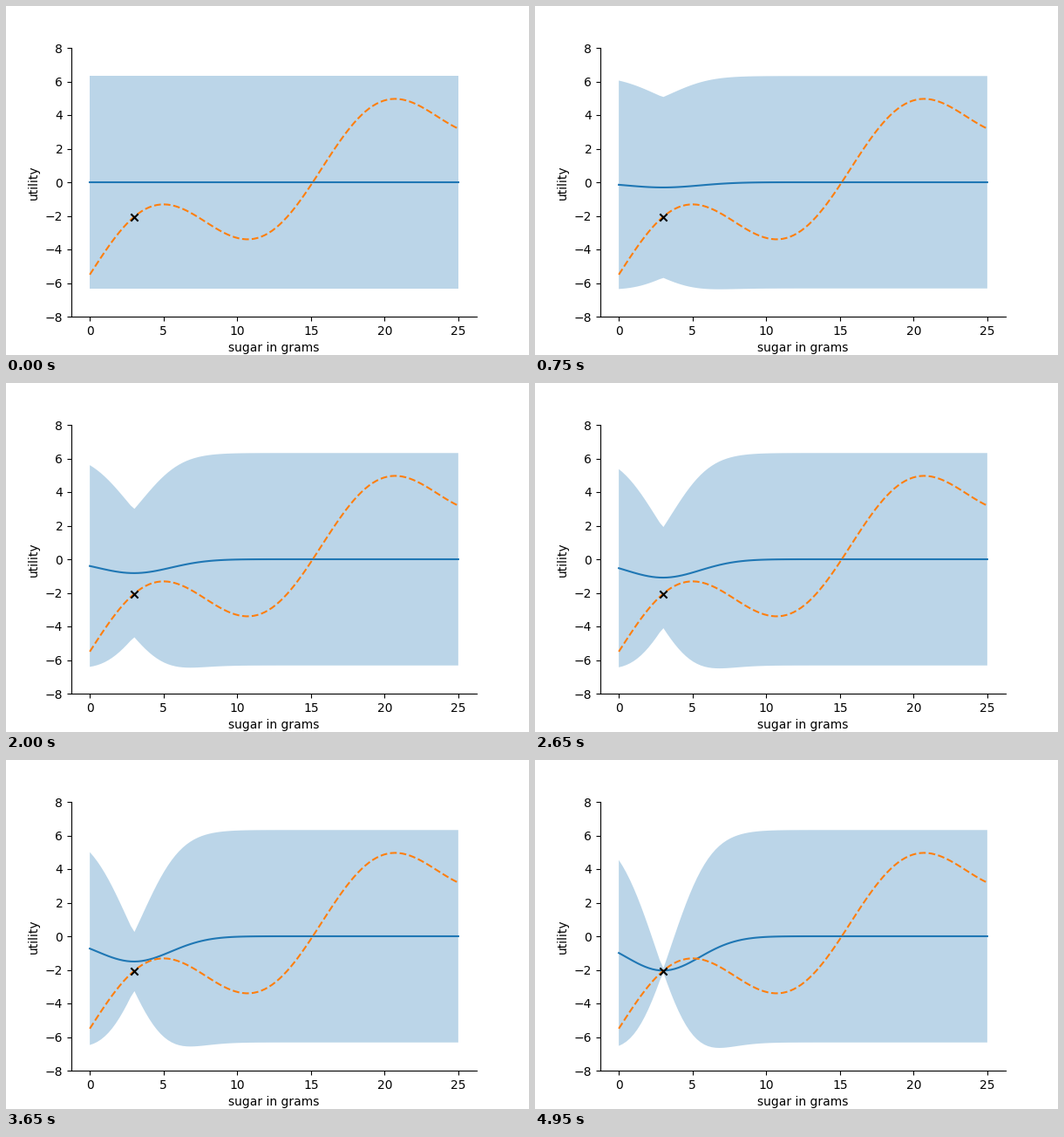
A matplotlib script that plays this animation: 600x400 px, repeating every 5 s.

```python
import numpy as np
import matplotlib.pyplot as plt
from matplotlib.animation import FuncAnimation

FRAMES = 100
INTERVAL = 50
VARIANCE = 10
LENGTH = 2.5
X_OBS = 3.0


def utility(x):
    return 0.4 * x + 2.4 * np.sin(0.4 * x) - 5.5


# Gaussian process conditioned on one observation
x = np.linspace(0, 25, 100)
corr = np.exp(-(x - X_OBS) ** 2 / (2 * LENGTH ** 2))
prior_sd = np.full_like(x, np.sqrt(VARIANCE))
post_mean = utility(X_OBS) * corr
post_sd = np.sqrt(VARIANCE * (1 - corr ** 2))


def belief(t):
    """Blend linearly from the prior (t=0) to the posterior (t=1)."""
    return t * post_mean, (1 - t) * prior_sd + t * post_sd


def band_outline(mean, sd):
    upper = np.column_stack([x, mean + 2 * sd])
    lower = np.column_stack([x, mean - 2 * sd])
    return np.vstack([upper, lower[::-1]])


fig, ax = plt.subplots(figsize=(6, 4), dpi=100)
mean, sd = belief(0)
band = ax.fill_between(x, mean - 2 * sd, mean + 2 * sd,
                       facecolor="C0", alpha=0.3)
mean_line, = ax.plot(x, mean, color="C0")
ax.plot(x, utility(x), "--", color="C1")
ax.scatter([X_OBS], [utility(X_OBS)], marker="x", color="black", zorder=3)

ax.set_xlim(-1.25, 26.25)
ax.set_ylim(-8, 8)
ax.set_xlabel("sugar in grams")
ax.set_ylabel("utility")
ax.spines[["top", "right"]].set_visible(False)


def update(i):
    mean, sd = belief(i / FRAMES)
    mean_line.set_ydata(mean)
    band.set_verts([band_outline(mean, sd)])
    return band, mean_line


anim = FuncAnimation(fig, update, frames=FRAMES, interval=INTERVAL,
                     repeat=True, repeat_delay=0)
plt.show()
```
